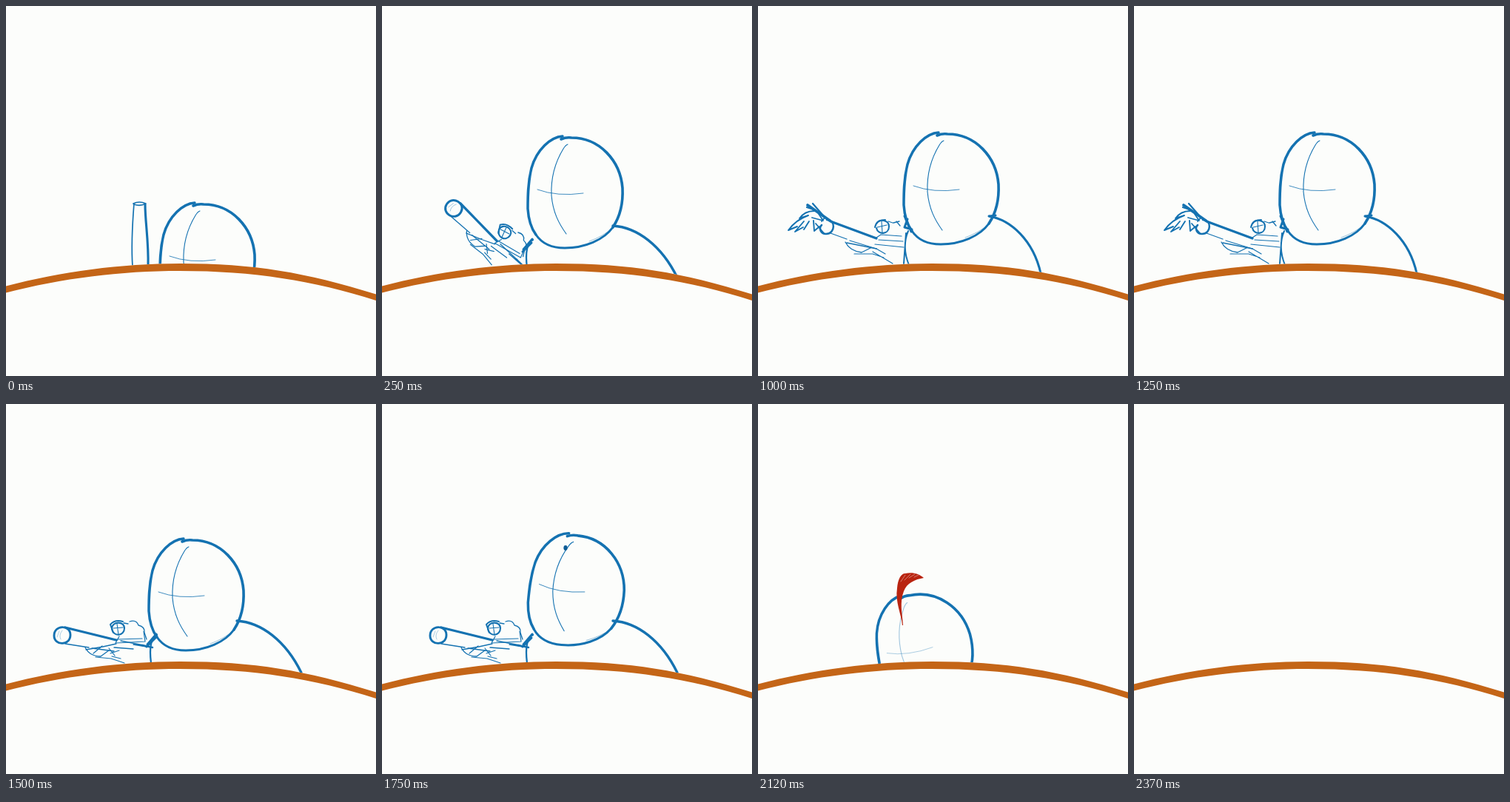
Write an HTML page with a canvas that moves like this. It is 500 by 500 pixels and loops after 2.5 s.

```html
<!DOCTYPE html>
<html lang="en">
<head>
<meta charset="utf-8">
<title>Pop up, aim, fire</title>
<style>
html, body { margin: 0; height: 100%; overflow: hidden; background: #fcfdfb; }
canvas { display: block; width: 100vw; height: 100vh; }
</style>
</head>
<body>
<canvas width="500" height="500"></canvas>
<script>
const ctx = document.querySelector('canvas').getContext('2d');
const PAPER = '#fcfdfb', BLUE = '#1472b1', GREEN = '#17c44b', RED = '#b92410', GROUND = '#c46517';
const LOOP = 2500;

// Each part is a list of strokes: [path, width, opacity]
const head = [
  ['M240 182C224 183 205 200 198 225C193 245 193 264 193 280C194 295 198 307 204 315', 3.5],
  ['M204 315C212 327 225 333 243 333C270 333 296 322 308 305', 3],
  ['M308 305C318 290 322 272 321 252C318 215 290 184 252 184Q245 183 238 186', 3.6]
];
const guides = [
  ['M247 193Q244 194 241 199C230 217 224 238 225 262C227 285 235 300 245 314', 1.1],
  ['M206 254Q233 264 268 259', .8],
  ['M276 324Q295 317 306 307', .7, .6]
];
const barrelUp = [
  ['M173 267C171 292 169 322 171 352', 1.7],
  ['M188 268C188 292 193 318 192 352', 3.1],
  ['M172 267Q180 263 189 267Q181 271 173 268', 1.7]
];
const gunAim = [
  ['M65 313C65 298 87 298 87 312C87 327 65 327 65 313Z', 2.9],
  ['M69 315L72 307M74 318Q71 312 76 306', .7, .5],
  ['M80 302L149 319', 3.3],
  ['M80 324L112 329M116 330L146 334', 1.3],
  ['M146 329L172 331M155 320L186 326M172 325L190 328', 1.3],
  ['M184 326L198 329', 2.4],
  ['M143 304C143 293 160 293 160 303C160 314 145 315 143 304Z', 2.1],
  ['M145 303L158 302M150 297L152 312', 1.1],
  ['M141 298Q147 291 158 294M141 298L145 309', 2],
  ['M159 296L165 297M167 294Q176 291 179 299Q188 301 187 309L190 318', 1.3],
  ['M153 314L148 323L188 321L186 307M150 318L184 317', 1.2],
  ['M107 329Q113 341 128 341L139 333M108 332L131 328L149 324', 1.3],
  ['M118 337L130 327M121 342L142 344L160 350M139 330L147 340M141 337L153 333M143 341L155 344', 1.2]
];
const gunFire = [
  ['M93 289C105 288 105 308 92 308C84 308 82 300 86 296', 2.5],
  ['M98 291L160 314', 3.3],
  ['M98 307L120 315M124 317L160 328', 1.3],
  ['M160 294C164 287 177 289 177 298C177 309 162 310 160 300', 2.1],
  ['M161 299L174 296M167 291L168 307', 1.1],
  ['M158 299Q160 289 172 289', 2],
  ['M176 291L182 293M183 293L191 291M187 291L192 297', 1.3],
  ['M160 313L166 309L194 311M163 316L196 318M158 322L197 326', 1.2],
  ['M118 319Q124 331 140 333L152 327M120 320L160 328', 1.3],
  ['M130 335L155 335L170 340M155 332L182 348M160 328L172 335', 1.2]
];
const flash = [
  ['M67 269L97 290', 3.8],
  ['M74 267L88 283M66 272L78 276', 2.2],
  ['M76 277Q63 277 56 287L68 283Q51 289 41 303L53 298', 1.9],
  ['M62 291L50 305L61 299M69 291L62 302M75 290L76 304L83 298', 1.9],
  ['M82 281L88 290L73 286M78 294L89 307M86 291L91 285', 1.8]
];
const bodies = {
  aim: [
    ['M312 293C345 295 378 320 399 363', 3.4],
    ['M204 312Q192 318 196 350', 2.3],
    ['M203 311L191 325M202 316L190 328', 3]
  ],
  fire: [
    ['M312 284C342 289 372 317 382 361', 3],
    ['M203 304Q194 325 204 350M200 307L197 348', 2],
    ['M198 284L207 305M202 288L198 299L208 302M313 284L321 283', 3]
  ],
  fall: [
    ['M308 324C330 327 362 342 380 361', 3],
    ['M198 351L202 343L204 351M309 322L313 314', 2]
  ]
};
const label = [
  ['M102 62C98 52 84 56 80 66C77 75 102 75 102 84C101 94 86 95 80 91', 2.6],
  ['M104 81C111 80 117 74 114 70C109 68 103 77 106 85C109 90 115 88 119 84', 2.5],
  ['M124 65C122 73 121 82 125 87M117 77L131 72', 2.5],
  ['M134 71C132 80 134 84 138 83C143 81 146 74 146 70Q145 78 148 82', 2.5],
  ['M151 69L154 90M151 71C158 65 163 71 160 77Q156 82 153 80', 2.5],
  ['M107 117C99 124 97 143 100 150C104 156 111 147 111 140C109 134 102 139 100 147', 2.6],
  ['M144 118C136 113 131 119 133 127C134 134 139 137 137 143Q136 147 132 146M128 131L146 126', 2.5],
  ['M150 126L153 140M152 134Q154 125 161 125M168 133L171 135', 2.5]
];
const bloodShape = new Path2D('M223 257C222 243 213 225 216 207C217 195 221 187 227 187' +
  'C238 185 246 188 252 193C240 195 229 200 225 211C219 227 223 240 224 257Z');

// Poses hold until the next start; head and gun are [dx, dy, degrees]
const aim = { head: [0, 0, 0], gun: [0, 0, 0], body: 'aim' };
const fire = { head: [4, -11, 0], body: 'fire' };
const poses = [
  [0, { head: [15, 84, 0], barrel: 0 }],
  [120, { head: [10, 38, 0], barrel: -36, body: 'aim', drop: 40 }],
  [250, { head: [4, -6, 0], gun: [14, 2, 32], body: 'aim', drop: 4 }],
  [370, { head: [1, -3, 0], gun: [2, 3, -3], body: 'aim' }],
  [500, { ...aim, label: true }],
  [1000, fire],
  [1120, aim],
  [1250, fire],
  [1370, aim],
  [1750, { ...aim, head: [6, -6, 5], wound: true }],
  [1870, { head: [2, 6, 0], gun: [2, 18, -3], body: 'aim', drop: 10, blood: [15, -30] }],
  [2000, { head: [-6, 32, -8], gun: [10, 56, -8], body: 'fall', blood: [0, 0], faint: .4 }],
  [2120, { head: [-32, 72, -12], blood: [-28, 42], faint: .4 }],
  [2250, { head: [-61, 107, -14], faint: .4 }],
  [2370, {}]
];

function strokes(list, color = BLUE, fade = 1) {
  ctx.strokeStyle = color;
  for (const [path, width, opacity = 1] of list) {
    ctx.lineWidth = width;
    ctx.globalAlpha = opacity * fade;
    ctx.stroke(new Path2D(path));
  }
  ctx.globalAlpha = 1;
}

function placed([dx, dy, degrees = 0], [cx, cy], paint) {
  ctx.save();
  ctx.translate(cx + dx, cy + dy);
  ctx.rotate(degrees * Math.PI / 180);
  ctx.translate(-cx, -cy);
  paint();
  ctx.restore();
}

function fill(path, color) {
  ctx.fillStyle = color;
  ctx.fill(path);
}

function drawGround() {
  const top = 'M0 378.5C75 359 155 348 235 348C335 348 405 360 500 389.5';
  fill(new Path2D(top + 'V500H0Z'), PAPER);
  fill(new Path2D(top + 'V398C415 371 335 358 235 358C155 358 75 368 0 387.5Z'), GROUND);
}

function drawBlood(offset) {
  placed(offset, [0, 0], () => {
    fill(bloodShape, RED);
    strokes([['M221 198L227 189M226 196L234 188M232 193L240 188M239 192L245 189', .7, .6]], PAPER);
  });
}

function draw(time) {
  const pose = poses.findLast(([start]) => start <= time)[1];
  ctx.fillStyle = PAPER;
  ctx.fillRect(0, 0, 500, 500);
  ctx.lineCap = ctx.lineJoin = 'round';

  if (pose.barrel !== undefined) placed([0, pose.barrel], [0, 0], () => strokes(barrelUp));
  if (pose.gun) placed(pose.gun, [151, 304], () => strokes(gunAim));
  if (pose === fire) strokes([...gunFire, ...flash]);
  if (pose.body) placed([0, pose.drop || 0], [0, 0], () => strokes(bodies[pose.body]));
  if (pose.head) placed(pose.head, [257, 258], () => {
    strokes(head);
    strokes(guides, BLUE, pose.faint);
  });
  if (pose.wound) {
    ctx.beginPath();
    ctx.ellipse(248, 194.5, 2.6, 3.4, 0, 0, 7);
    ctx.fillStyle = '#0d5c95';
    ctx.fill();
  }
  drawGround();
  if (pose.blood) drawBlood(pose.blood);
  if (pose.label) strokes(label, GREEN);
}

function tick() {
  draw(performance.now() % LOOP);
  requestAnimationFrame(tick);
}
tick();
</script>
</body>
</html>
```
